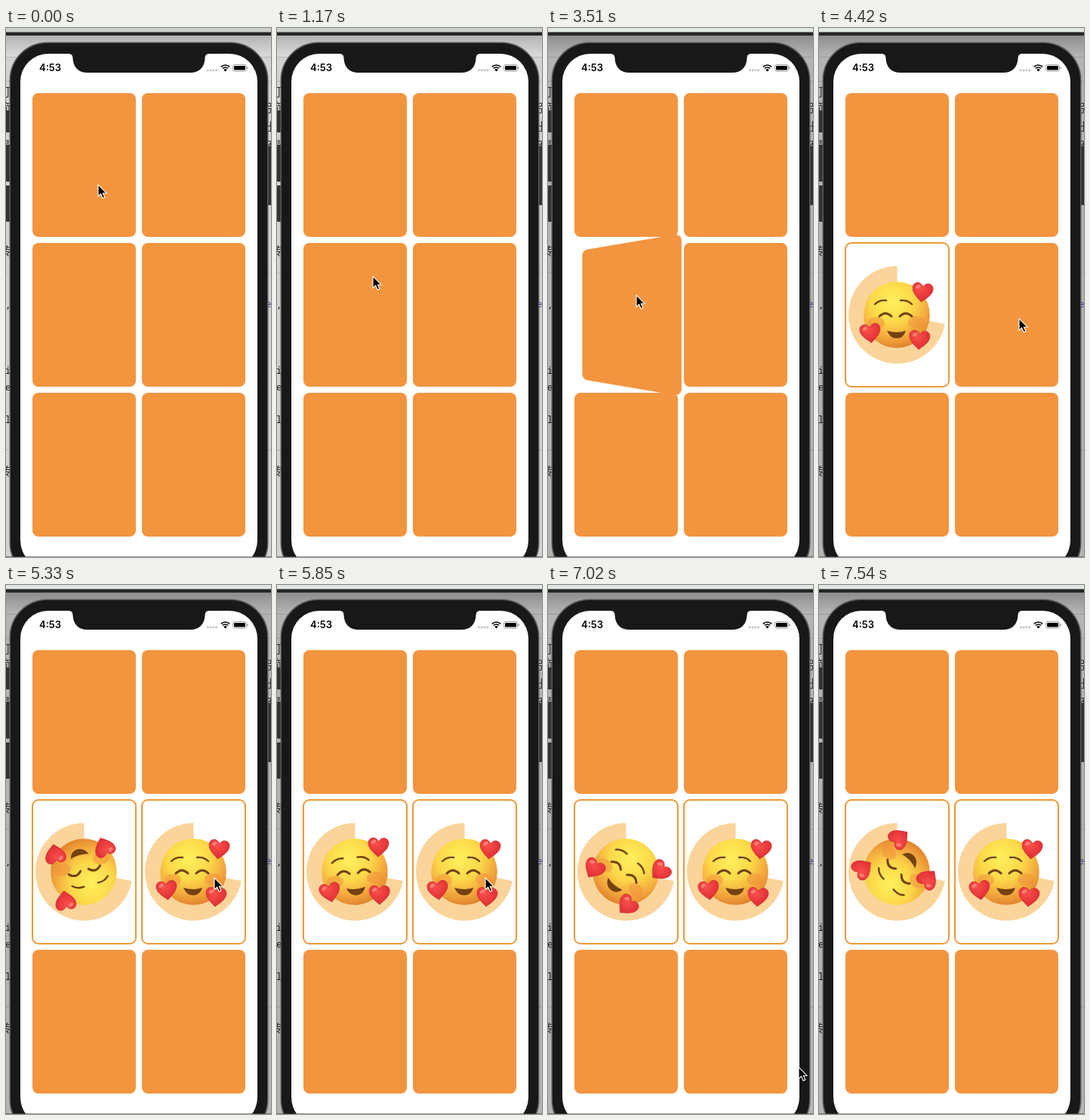
These frames come from a looping animation (351 by 699 pixels, 7.67 s). An HTML page with a canvas:

```html
<!DOCTYPE html>
<html lang="en">
<head>
<meta charset="utf-8">
<style>
html, body { margin: 0; width: 100%; height: 100%; overflow: hidden; background: #ccc; }
#stage { position: relative; width: 351px; height: 699px; overflow: hidden; }
#stage > * { position: absolute; }
.card { width: 137px; height: 190px; }
.back, .front { position: absolute; inset: 0; border-radius: 8px; background: #f3953f; }
.front { inset: -1px; box-sizing: border-box; border: 2px solid #ec9a38; border-radius: 9px; background: #fff; }
.front svg { position: absolute; left: -1px; top: -1px; overflow: visible; }
#cursor { left: 0; top: 0; overflow: visible; }
</style>
</head>
<body>
<div id="stage"><canvas id="scene" width="351" height="699"></canvas></div>
<script>
const LOOP = 7670, STEP = 130;
const FOCUS = 2860, FLIP_TIME = 350, FLIP_A = 3440, FLIP_B = 4840;

const SPIN = [[4865, 0], [5330, 164], [6370, 546], [7020, 760], [7540, 947]];
const POINTER = [
  [0, 122, 207], [780, 130, 318], [910, 130, 318], [1170, 127, 328], [1690, 127, 328],
  [2340, 116, 351], [2990, 116, 351], [3250, 117, 353], [3770, 117, 353],
  [4420, 265, 384], [4810, 267, 385], [5200, 276, 387], [6500, 276, 387],
  [7020, 332, 637], [7280, 344, 712]
];

const stage = document.getElementById('stage');
const ctx = document.getElementById('scene').getContext('2d');

function track(keys, t) {
  if (t <= keys[0][0]) return keys[0].slice(1);
  for (let i = 1; i < keys.length; i++) {
    const a = keys[i - 1], b = keys[i];
    if (t <= b[0]) {
      const k = (t - a[0]) / (b[0] - a[0]);
      return a.slice(1).map((v, j) => v + (b[j + 1] - v) * k);
    }
  }
  return keys[keys.length - 1].slice(1);
}

const clamp = v => Math.max(0, Math.min(1, v));
const ease = k => k * k * (3 - 2 * k);

// ---- phone and the window behind it ----

function rect(x, y, w, h, fill) {
  ctx.fillStyle = fill;
  ctx.fillRect(x, y, w, h);
}

function rounded(x, y, w, h, r, fill) {
  ctx.beginPath();
  ctx.roundRect(x, y, w, h, r);
  ctx.fillStyle = fill;
  ctx.fill();
}

function label(text, x, y, font, fill, align = 'left') {
  ctx.font = font;
  ctx.fillStyle = fill;
  ctx.textAlign = align;
  ctx.fillText(text, x, y);
}

function backdrop(focused) {
  rect(0, 0, 351, 699, focused ? '#b4b4b4' : '#d2d2d2');
  const shade = ctx.createLinearGradient(0, 10, 0, 40);
  shade.addColorStop(0, focused ? '#8d8d8d' : '#b3b3b3');
  shade.addColorStop(1, focused ? '#b9b9b9' : '#dedede');
  rect(0, 10, 351, 29, shade);
  rect(0, 0, 351, 5, focused ? '#e0e7e2' : '#cbd0cc');
  rect(0, 5, 351, 5, '#242625');
  rect(0, 5, 351, 1, '#777');
  for (const y of [38, 70, 322, 557]) rect(0, y, 351, 1, focused ? '#999' : '#b5b5b5');

  const cjk = '15px "Noto Sans CJK SC", "Noto Sans CJK", sans-serif';
  const mono = '12px "Noto Sans Mono", monospace';
  [['可', 90], ['简', 110], ['的', 135], ['是', 160], ['转', 300], ['转', 591]]
    .forEach(([s, y]) => label(s, 6, y, cjk, '#333', 'right'));
  [[',', 370], ['i', 457], ['e', 479], ['l', 522]]
    .forEach(([s, y]) => label(s, -1, y, mono, '#111'));
  [['引', 111], ['出', 136], ['不', 161]].forEach(([s, y]) => label(s, 343, y, cjk, '#333'));
  label('e', 344, 369, mono, '#33338f');
}

function phone() {
  for (const [y, h] of [[109, 29], [155, 48], [208, 48]]) rounded(0, y, 8, h, 1, '#333');
  rounded(345, 156, 8, 78, 1, '#333');
  rounded(4.5, 18.5, 343, 712, 50, '#5b5b5b');
  rounded(6, 20, 340, 709, 49, '#181818');
  rounded(19, 34, 314, 680, 37, '#fff');

  // notch
  ctx.beginPath();
  ctx.moveTo(82, 33);
  ctx.lineTo(83, 34);
  ctx.quadraticCurveTo(88.5, 34, 88.5, 40);
  ctx.bezierCurveTo(89, 52, 96, 59, 108, 59);
  ctx.lineTo(244, 59);
  ctx.bezierCurveTo(256, 59, 263, 52, 263.5, 40);
  ctx.quadraticCurveTo(263.5, 34, 269, 34);
  ctx.lineTo(270, 33);
  ctx.fillStyle = '#181818';
  ctx.fill();

  label('4:53', 44, 57, '600 13px Inter, "Liberation Sans", sans-serif', '#000');
  for (let i = 0; i < 4; i++) rounded(266 + i * 3.8, 54.5, 2.8, 2.8, 1, '#c4c4c4');

  // wifi
  ctx.strokeStyle = '#000';
  ctx.lineWidth = 1.7;
  for (const r of [8, 5]) {
    ctx.beginPath();
    ctx.arc(290.5, 57, r, -Math.PI * 0.75, -Math.PI * 0.25);
    ctx.stroke();
  }
  ctx.beginPath();
  ctx.moveTo(290.5, 57.5);
  ctx.arc(290.5, 57.5, 3.2, -Math.PI * 0.75, -Math.PI * 0.25);
  ctx.fillStyle = '#000';
  ctx.fill();

  // battery
  ctx.lineWidth = 0.8;
  ctx.strokeStyle = '#888';
  ctx.beginPath();
  ctx.roundRect(300.5, 48.5, 18, 8.6, 2.5);
  ctx.stroke();
  rounded(302, 50, 15, 5.6, 1.3, '#000');
  rounded(319.4, 51.2, 1.2, 3.2, 0.6, '#888');
  rect(0, 698, 351, 1, 'rgba(70,70,70,.55)');
}

// ---- cards ----

const heart = (x, y, turn) => `<g transform="translate(${x} ${y}) rotate(${turn})">
  <path d="M0 13C-4 9-13.5 3-13.5-5C-13.5-13-3.5-14.5 0-7C3.5-14.5 13.5-13 13.5-5C13.5 3 4 9 0 13Z"
    fill="url(#red)" stroke="#c92a30" stroke-width=".7"/>
  <ellipse cx="-6.5" cy="-6.5" rx="3.6" ry="2.2" transform="rotate(-35 -6.5 -6.5)" fill="#ff8d84" opacity=".75"/></g>`;

const pieEnd = 10.8 * Math.PI / 180, pieR = 64.5;
const picture = `<svg width="137" height="190">
  <defs>
    <radialGradient id="skin" cx=".43" cy=".3" r=".72">
      <stop offset="0" stop-color="#fff05c"/><stop offset=".45" stop-color="#fcd849"/>
      <stop offset=".78" stop-color="#f2a53c"/><stop offset="1" stop-color="#df812c"/>
    </radialGradient>
    <radialGradient id="red" cx=".4" cy=".3" r=".75">
      <stop offset="0" stop-color="#f9504b"/><stop offset="1" stop-color="#dc2932"/>
    </radialGradient>
  </defs>
  <path transform="translate(68.5 95)" fill="#fad49a"
    d="M0 0V${-pieR}A${pieR} ${pieR} 0 1 0 ${pieR * Math.cos(pieEnd)} ${pieR * Math.sin(pieEnd)}Z"/>
  <g transform="translate(68 95)"><g class="face">
    <circle r="43.8" fill="url(#skin)"/>
    <ellipse cx="-27" cy="11" rx="11" ry="8" fill="#ef8d3c" opacity=".5"/>
    <ellipse cx="26" cy="10" rx="11" ry="8" fill="#ef8d3c" opacity=".5"/>
    <g fill="none" stroke="#74420f" stroke-linecap="round">
      <path d="M-29-14Q-23-20-14-19M5-19Q14-20 20-14" stroke-width="2.4"/>
      <path d="M-23 2Q-15-6-7 2M4 2Q12-6 20 2" stroke-width="3"/>
    </g>
    <path d="M-13 21Q0 25 12 21Q9 31 0 31Q-9 31-13 21Z" fill="#74420f"/>
    ${heart(34, -30, 7)}${heart(-35, 24, -7)}${heart(30, 33, 5)}
  </g></g></svg>`;

const cards = [];
for (let i = 0; i < 6; i++) {
  const card = document.createElement('div');
  card.className = 'card';
  card.style.left = 35 + (i % 2) * 145 + 'px';
  card.style.top = [86, 284, 481.5][i >> 1] + 'px';
  card.innerHTML = '<div class="back"></div>';
  if (i === 2 || i === 3) card.innerHTML += `<div class="front">${picture.replace(/(id="|#)(skin|red)/g, `$1$2${i}`)}</div>`;
  stage.append(card);
  cards.push(card);
}

function flip(card, t, start) {
  const k = ease(clamp((t - start) / FLIP_TIME));
  const angle = 180 * (1 - k);
  card.style.transform = k > 0 && k < 1 ? `perspective(190px) rotateY(${angle}deg)` : '';
  card.style.zIndex = k > 0 && k < 1 ? 1 : 0;
  card.querySelector('.front').style.visibility = angle < 90 ? 'visible' : 'hidden';
  card.querySelector('.back').style.visibility = angle < 90 ? 'hidden' : 'visible';
}

stage.insertAdjacentHTML('beforeend', `<svg id="cursor" width="14" height="20" style="z-index:2">
  <path d="M0 0V15.5L3.6 12.2L6.2 18L8.8 16.8L6.3 11.2H11Z" fill="#000" stroke="#fff" stroke-width="1.1"/></svg>`);
const cursor = document.getElementById('cursor');
const face = cards[2].querySelector('.face');

let shown = -1;
function frame(now) {
  const t = Math.floor((now % LOOP) / STEP) * STEP;
  if (t !== shown) {
    shown = t;
    backdrop(t >= FOCUS);
    phone();
    flip(cards[2], t, FLIP_A);
    flip(cards[3], t, FLIP_B);
    face.setAttribute('transform', `rotate(${track(SPIN, t)[0]})`);
    const [x, y] = track(POINTER, t);
    cursor.style.transform = `translate(${x}px, ${y}px)`;
  }
  requestAnimationFrame(frame);
}
const begin = performance.now();
frame(0);
requestAnimationFrame(function run() {
  frame.start = begin;
});
</script>
</body>
</html>
```
